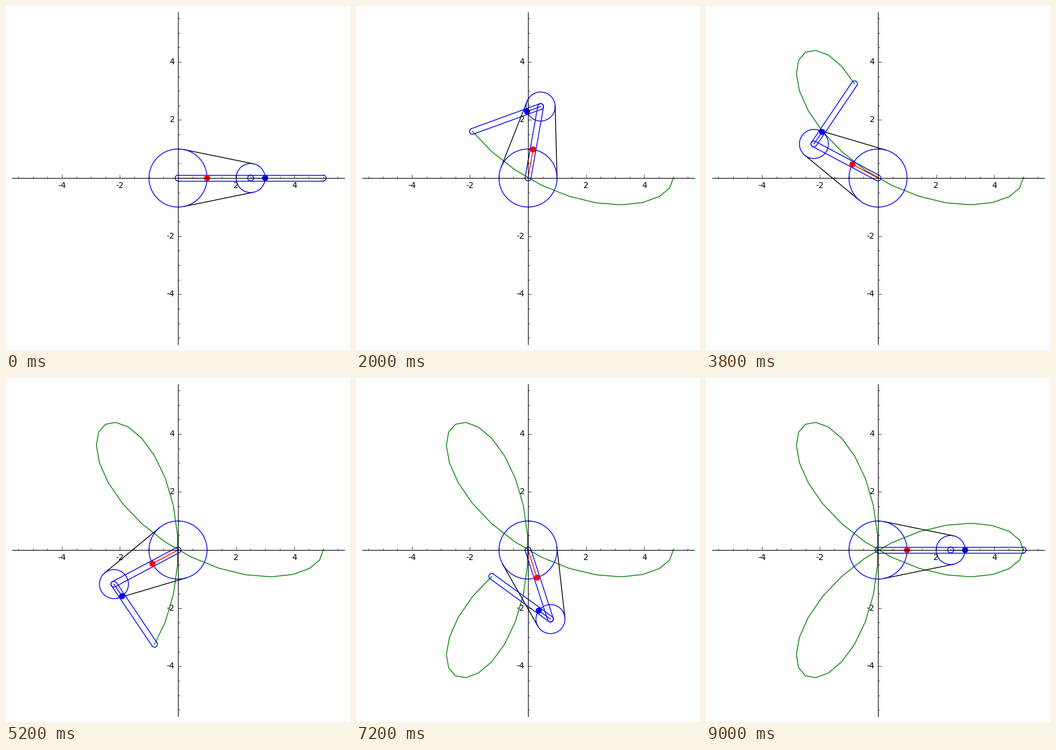
Animation, 584 px wide and 584 px high, one loop 9.2 s. Source, as a matplotlib script:

```python
import numpy as np
import matplotlib.pyplot as plt
from matplotlib.animation import FuncAnimation
from matplotlib.patches import Circle

SIZE, DPI = 584, 100
UNIT = 49.3                 # pixels per unit
CENTER = 292.05
STEPS = 45
ARM, BIG, SMALL, HALF = 2.5, 1.0, 0.5, 0.1
DOT = 0.09
PT = DPI / 72

fig = plt.figure(figsize=(SIZE / DPI, SIZE / DPI), dpi=DPI, facecolor="white")
ax = fig.add_axes([0, 0, 1, 1])
ax.set_xlim(0, SIZE)
ax.set_ylim(SIZE, 0)
ax.axis("off")


def px(z):
    """Complex plane position to stage pixels."""
    z = np.asarray(z)
    return CENTER + UNIT * z.real, CENTER - UNIT * z.imag


def turn(angle):
    return np.exp(1j * angle)


def line(color):
    return ax.plot([], [], color=color, lw=1, zorder=2)[0]


def ring(radius):
    return ax.add_patch(Circle((CENTER, CENTER), radius * UNIT, lw=1,
                               fill=False, edgecolor="blue", zorder=2.2))


def dot(color):
    return ax.add_patch(Circle((CENTER, CENTER), DOT * UNIT, lw=1,
                               color=color, zorder=2.3))


def draw_axes():
    style = dict(color="black", solid_capstyle="butt", zorder=2.5)
    ax.plot([10, 575], [CENTER, CENTER], lw=0.8, **style)
    ax.plot([CENTER, CENTER], [10, 575], lw=0.8, **style)
    for i in range(-11, 12):
        if i == 0:
            continue
        major = i % 4 == 0
        size = (4 if major else 2) * PT
        x, y = px(i / 2 * (1 + 1j))
        ax.plot([x, x], [CENTER, CENTER - size], lw=0.5, **style)
        ax.plot([CENTER, CENTER + size], [y, y], lw=0.5, **style)
        if major:
            font = dict(family="DejaVu Sans", fontsize=10, zorder=2.5)
            label = str(i // 2)
            ax.text(x, CENTER + 4 * PT, label, ha="center", va="top", **font)
            ax.text(CENTER - 4 * PT, y, label, ha="right", va="center", **font)


class Arm:
    """A bar with round ends."""

    def __init__(self):
        self.sides = [line("blue"), line("blue")]
        self.caps = [line("blue"), line("blue")]

    def place(self, start, angle):
        end = start + ARM * turn(angle)
        for side, sign in zip(self.sides, (1, -1)):
            shift = sign * HALF * turn(angle + np.pi / 2)
            side.set_data(*px([start + shift, end + shift]))
        sweep = np.linspace(-np.pi / 2, np.pi / 2, 40)
        self.caps[0].set_data(*px(start - HALF * turn(angle + sweep)))
        self.caps[1].set_data(*px(end + HALF * turn(angle + sweep)))


draw_axes()
trail = line("green")
belts = [line("black"), line("black")]
arms = [Arm(), Arm()]
red_hand = line("red")
blue_hand = line("blue")
ring(BIG)
wheel = ring(SMALL)
red_dot = dot("red")
blue_dot = dot("blue")

angles = 2 * np.pi * np.arange(STEPS + 1) / STEPS
path = ARM * (turn(angles) + turn(-2 * angles))
# Angle between the arm and the belt's contact points
contact = np.arccos((BIG - SMALL) / ARM)


def update(k):
    angle = angles[k]
    pivot = ARM * turn(angle)
    red = BIG * turn(angle)
    blue = pivot + SMALL * turn(-2 * angle)

    wheel.center = px(pivot)
    red_dot.center = px(red)
    blue_dot.center = px(blue)
    red_hand.set_data(*px([0, red]))
    blue_hand.set_data(*px([pivot, blue]))
    arms[0].place(0, angle)
    arms[1].place(pivot, -2 * angle)
    for belt, sign in zip(belts, (1, -1)):
        normal = turn(angle + sign * contact)
        belt.set_data(*px([BIG * normal, pivot + SMALL * normal]))
    trail.set_data(*px(path[:k + 1] if k else path[:0]))
    return []


anim = FuncAnimation(fig, update, frames=STEPS + 1, interval=200,
                     init_func=lambda: update(0), repeat=True,
                     repeat_delay=0, blit=False)
plt.show()
```
